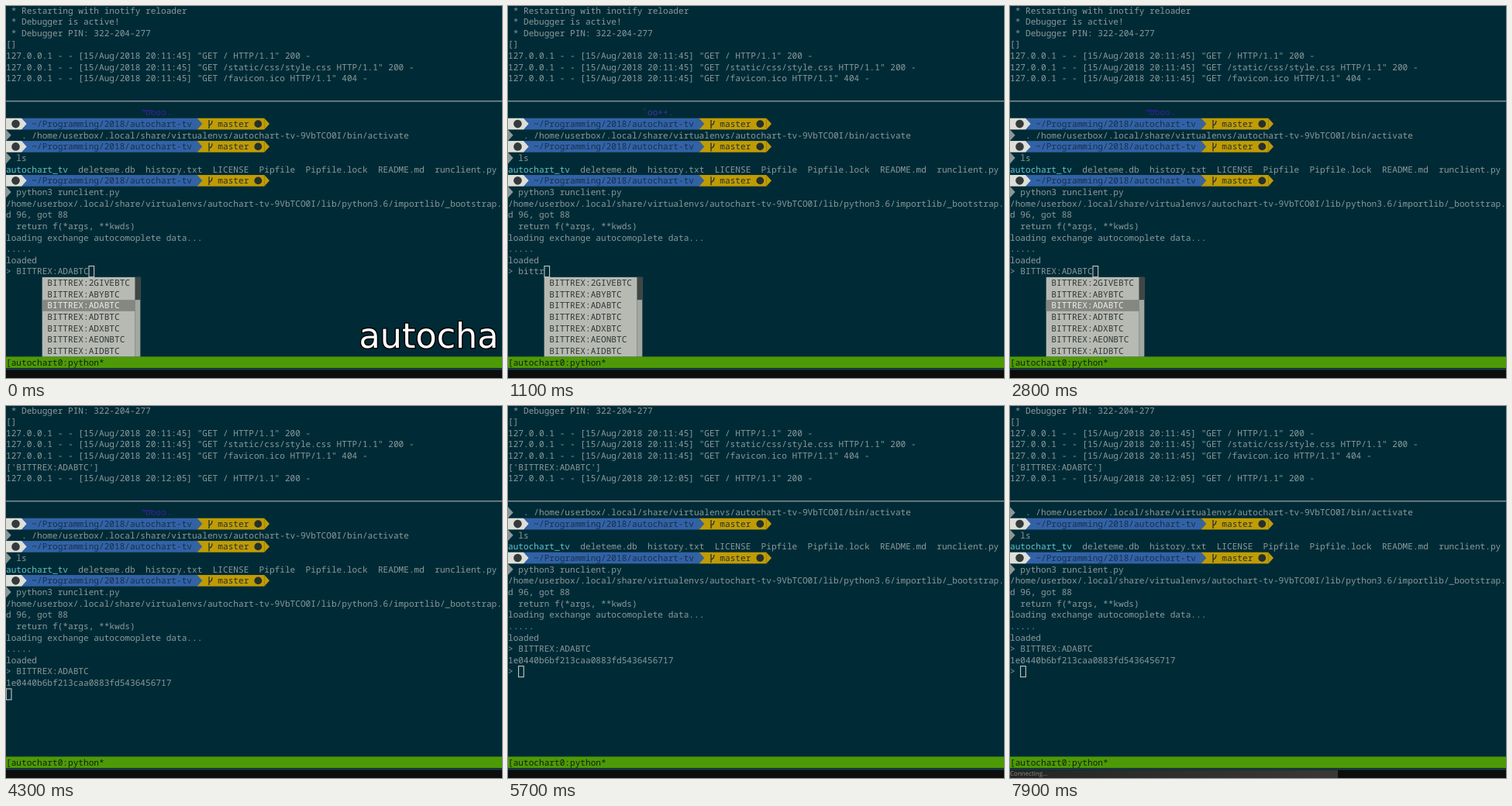
Write an HTML page that moves like this. It is 640 px wide and 480 px high and loops after 8 s.

```html
<!DOCTYPE html>
<html lang="en">
<head>
<meta charset="utf-8">
<title>Terminal autocomplete</title>
<style>
  html, body { margin: 0; width: 100%; height: 100%; overflow: hidden; background: #002b36; }
  svg { display: block; width: 640px; height: 480px; }
  text { white-space: pre; text-rendering: geometricPrecision; }
  .mono { font: 11.11px "Noto Sans Mono", "DejaVu Sans Mono", monospace; }
  .caption { font: 44.5px "DejaVu Sans", sans-serif; }
  .status { font: 8px "Open Sans", "Noto Sans", sans-serif; }
</style>
</head>
<body>
<svg id="stage" viewBox="0 0 640 480" xmlns="http://www.w3.org/2000/svg"></svg>
<script>
const LOOP = 8000, COL = 20 / 3, ROW = 14.65;
const BG = "#002b36", FG = "#8a9a9b", LIGHT = "#dedfd9", BLUE = "#3262a6",
      GOLD = "#c09c04", DARK = "#24302f", MENU = "#b7bab3";
const stage = document.getElementById("stage");

const mid = row => 5.6 + ROW * row;
const top_ = row => mid(row) - ROW / 2;

const rect = (x, y, w, h, fill) =>
  `<rect x="${x}" y="${y}" width="${w}" height="${h}" fill="${fill}"/>`;
const cells = (col, row, n, fill, rows = 1) =>
  rect(col * COL, top_(row), n * COL, ROW * rows, fill);
const text = (col, row, str, fill = FG, extra = "") =>
  `<text class="mono" x="${col * COL}" y="${mid(row) + 3.9}" fill="${fill}" ${extra}>${str}</text>`;
const arrow = (col, row, fill) =>
  `<path d="M${col * COL} ${top_(row)}l${COL} ${ROW / 2}l${-COL} ${ROW / 2}z" fill="${fill}"/>`;
const circle = (x, y, r, fill) => `<circle cx="${x}" cy="${y}" r="${r}" fill="${fill}"/>`;
const lines = (list, row) => list.map((s, i) => text(0, row + i, s)).join("");

function prompt(row) {
  const y = mid(row);
  return cells(3, row, 34, BLUE) + cells(0, row, 3, LIGHT) + arrow(3, row, LIGHT) +
    cells(37, row, 13, GOLD) + arrow(37, row, BLUE) + arrow(50, row, GOLD) +
    circle(12.5, y, 5.3, "#343a3a") +
    text(5, row, "~/Programming/2018/autochart-tv", "#182f4c") +
    `<path d="M262 ${y + 6}V${y - 5}M262 ${y + 2}q4 -1 4 -6" fill="none" stroke="${DARK}" stroke-width="1.3"/>` +
    text(41, row, "master", DARK) + circle(325.3, y, 4.9, DARK);
}

const command = (row, str) => arrow(0, row, "#8b9796") + text(2, row, str);

const request = (path, code, time = "20:11:45") =>
  `127.0.0.1 - - [15/Aug/2018 ${time}] "GET ${path} HTTP/1.1" ${code} -`;

const serverLog = [
  " * Restarting with inotify reloader",
  " * Debugger is active!",
  " * Debugger PIN: 322-204-277",
  "[]",
  request("/", 200),
  request("/static/css/style.css", 200),
  request("/favicon.ico", 404),
  "['BITTREX:ADABTC']",
  request("/", 200, "20:12:05")
];

const venv = "/home/userbox/.local/share/virtualenvs/autochart-tv-9VbTCO0I/";
const files = "deleteme.db  history.txt  LICENSE  Pipfile  Pipfile.lock  README.md  runclient.py";

function shell(scroll) {
  const r = 10 - scroll;
  return (scroll ? "" : prompt(r)) +
    command(r + 1, ` . ${venv}bin/activate`) +
    prompt(r + 2) + command(r + 3, "ls") +
    text(0, r + 4, "autochart_tv", "#62c3cb", 'font-weight="bold"') + text(14, r + 4, files) +
    prompt(r + 5) + command(r + 6, "python3 runclient.py") +
    lines([
      venv + "lib/python3.6/importlib/_bootstrap.",
      "d 96, got 88",
      "  return f(*args, **kwds)",
      "loading exchange autocomoplete data...",
      ".....",
      "loaded"
    ], r + 7);
}

const pairs = ["2GIVEBTC", "ABYBTC", "ADABTC", "ADTBTC", "ADXBTC", "AEONBTC", "AIDBTC"]
  .map(s => "BITTREX:" + s);
const general = ["BIT", "BITA", "BITBBTC", "BITMARKBTC",
  "BITFINEX:BTCUSDT", "BITFINEX:LTCUSDT", "BITFINEX:LTCBTC"];

function menu(col, items, width, picked = -1) {
  return cells(col, 24, width, MENU, 7) +
    cells(col + width, 24, 1, "#a3a7a0", 7) + cells(col + width, 24, 1, "#414544", 2) +
    (picked < 0 ? "" : cells(col, 24 + picked, width, "#858782")) +
    items.map((s, i) => text(col + 1, 24 + i, s, i === picked ? "#eeeeea" : "#303635")).join("");
}

const cursor = (col, row) =>
  `<rect x="${col * COL + .3}" y="${top_(row) + .4}" width="${COL}" height="${ROW - .6}" fill="none" stroke="#d3d9d5"/>`;

const input = str => text(0, 23, "> " + str) + cursor(2 + str.length, 23);
const smudge = crisp => crisp
  ? text(26, 9, "`oo++.", "#4033b4")
  : text(26, 9, "'oooo.", "#30249a", 'font-weight="bold"') + rect(176, 134, 14, 2, "#261f82");

const typed = word => input(word) + smudge(true);
const choose = i => input(pairs[i]) + menu(7, pairs, 18, i) + smudge(false);
const answer = (row, col, end) =>
  lines(["> BITTREX:ADABTC", "1e0440b6bf213caa0883fd5436456717", end], row) + cursor(col, row + 2);

const caption = `<text class="caption" x="455.5" y="441" fill="#fff" stroke="#000" stroke-width="3" paint-order="stroke" stroke-linejoin="round">autocha</text>`;
const status = `<defs><linearGradient id="fade"><stop stop-color="#252525"/><stop offset="1" stop-color="#393836"/></linearGradient></defs>` +
  rect(0, 470, 423, 10, "url(#fade)") +
  `<text class="status" x="0" y="477.3" fill="#8c8c88">Connecting...</text>`;

// [start ms, server log offset, shell scroll, contents]
const scenes = [
  [0, 0, 0, choose(2) + caption],
  [200, 0, 0, typed("")],
  [300, 0, 0, typed("b")],
  [500, 0, 0, typed("bi") + menu(4, general, 29)],
  [700, 0, 0, typed("bit") + menu(5, general, 29)],
  [900, 0, 0, typed("bitt") + menu(6, pairs, 18)],
  [1100, 0, 0, typed("bittr") + menu(7, pairs, 18)],
  [1200, 0, 0, input("bittr") + menu(7, pairs, 18) + smudge(false)],
  [2100, 0, 0, choose(0)],
  [2300, 0, 0, choose(1)],
  [2600, 0, 0, choose(2)],
  [4300, 2, 0, answer(23, 0, "") + smudge(false)],
  [5700, 2, 2, answer(21, 2, ">")],
  [6700, 2, 2, answer(21, 2, ">") + status]
];

const frame = rect(0, 0, 640, 480, BG) + rect(0, 122, 640, 1.5, "#7f9092") +
  cells(0, 31, 96, "#4e9a06") + text(0, 31, "[autochart0:python*", "#10200f") +
  rect(0, 468.5, 640, 1, "#41595d") + rect(0, 469.5, 640, 10.5, "#0d0d0d");

let shown;
function draw(now) {
  const t = now % LOOP;
  const scene = scenes.findLast(s => s[0] <= t);
  if (scene !== shown) {
    const [, offset, scroll, content] = scene;
    stage.innerHTML = frame + lines(serverLog.slice(offset, offset + 7), 0) + shell(scroll) + content;
    shown = scene;
  }
}

const start = performance.now();
function tick() {
  draw(performance.now() - start);
  requestAnimationFrame(tick);
}
tick();
</script>
</body>
</html>
```
